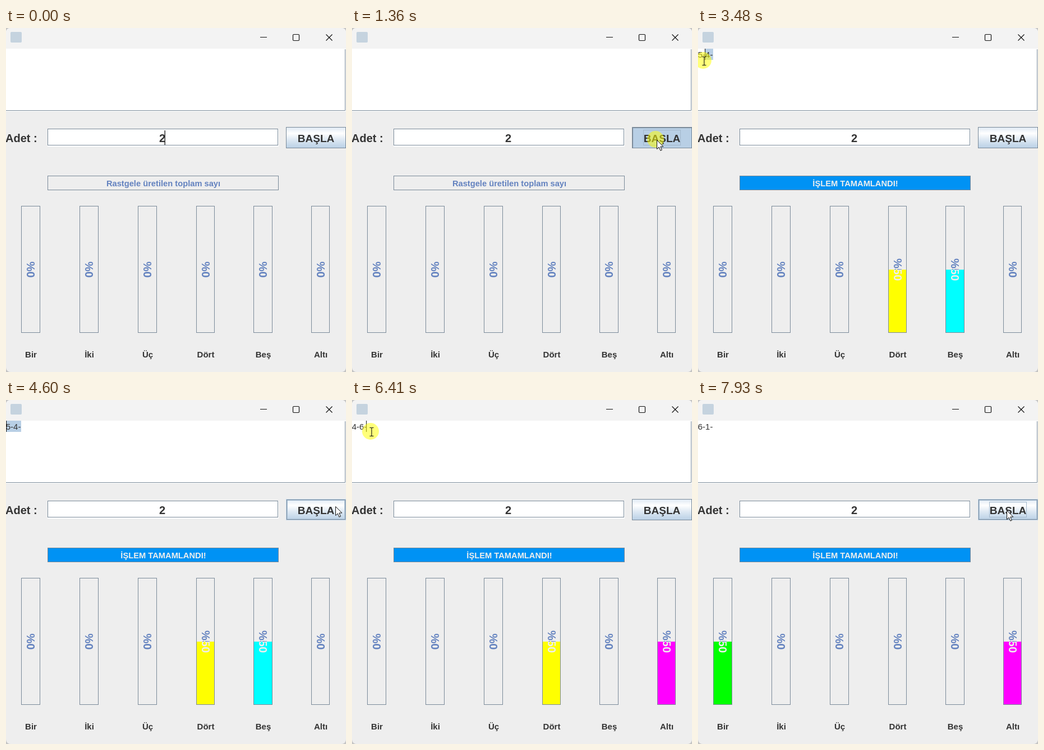
Recreate the animation shown at these times as an HTML page. Size 606 px wide and 615 px high, loop 8 s.

```html
<!DOCTYPE html>
<html lang="tr">
<head>
<meta charset="utf-8">
<style>
  html, body { margin: 0; width: 100%; height: 100%; overflow: hidden; background: #c4c4c4; }
  svg { display: block; }
  text { font-family: Arial, "Liberation Sans", sans-serif; fill: #333; white-space: pre; }
  .b { font-weight: bold; }
  .mid { text-anchor: middle; }
  .blue { fill: #6382bf; }
  .light { fill: #eee; }
  .edge { fill: none; stroke: #7a8a99; }
</style>
</head>
<body>
<svg id="stage" width="606" height="615" viewBox="0 0 606 615">
  <defs>
    <linearGradient id="metal" x2="0" y2="1">
      <stop stop-color="#dde8f3"/><stop offset=".3" stop-color="#fff"/>
      <stop offset=".6" stop-color="#dde8f3"/><stop offset="1" stop-color="#b8cfe5"/>
    </linearGradient>
  </defs>
  <rect width="606" height="615" rx="8" fill="#eee"/>
  <path d="M0 37V8Q0 0 8 0H598Q606 0 606 8V37Z" fill="#f3f3f3"/>
  <rect x="8" y="7" width="20" height="19" rx="2" fill="#c5d3df"/>
  <path d="M453 16.5h12M570.5 11.5l11 11M581.5 11.5l-11 11" stroke="#111" stroke-width="1.2"/>
  <rect x="511.5" y="11.5" width="11" height="11" rx="1.5" fill="none" stroke="#111" stroke-width="1.2"/>

  <rect y="37" width="606" height="112" fill="#fff"/>
  <path class="edge" d="M0 147.5H604.5V38"/>
  <rect id="selection" y="37" height="20" fill="#b8cfe5"/>
  <text id="log" x="-.3" y="53" font-size="15"></text>
  <rect id="logCaret" y="37" width="1.2" height="20" fill="#333"/>

  <text class="b" x="-1" y="204" font-size="20">Adet :</text>
  <rect x="74" y="180" width="412" height="32" fill="#fff"/>
  <rect class="edge" x="74.5" y="180.5" width="410" height="29"/>
  <text class="b mid" x="278.5" y="204" font-size="20">2</text>
  <rect id="fieldCaret" x="282.5" y="183" width="1.5" height="26" fill="#333"/>

  <rect id="button" x="499" y="177" width="107" height="38"/>
  <rect class="edge" x="499.5" y="177.5" width="106" height="37"/>
  <path id="pressed" class="edge" d="M500.5 214V178.5H605"/>
  <g id="hover" fill="none">
    <rect x="499.5" y="177.5" width="106" height="37" stroke="#b8cfe5"/>
    <rect x="500.5" y="178.5" width="104" height="35" stroke="#7a8a99"/>
    <rect x="501.5" y="179.5" width="102" height="33" stroke="#b8cfe5"/>
  </g>
  <rect id="focus" x="519.5" y="182.5" width="66" height="27" fill="none" stroke="#a3b8cc"/>
  <text class="b mid" x="552.5" y="204" font-size="19">BAŞLA</text>

  <rect id="total" x="74" y="264" width="412" height="26"/>
  <rect class="edge" x="74.5" y="264.5" width="411" height="25"/>
  <text id="status" class="b mid" x="280.5" y="283" font-size="14.7"></text>

  <g id="bars"></g>
  <circle id="glow" r="15" fill="#ff0" opacity=".52"/>
  <path id="arrow" d="M.5 .5V16.5L4.2 13 6.8 19.2 9.4 18.1 6.8 12H11.8Z" fill="#fff" stroke="#111"/>
  <path id="beam" d="M-3.5 -7.5H-1Q0 -7.5 0 -6.5Q0 -7.5 1 -7.5H3.5M0 -6.5V6.5M-3.5 7.5H-1Q0 7.5 0 6.5Q0 7.5 1 7.5H3.5" fill="none" stroke="#111" stroke-width="1.1"/>
</svg>
<script>
const LOOP = 8000;
const $ = id => document.getElementById(id);
const show = (id, on) => $(id).style.display = on ? '' : 'none';
const within = (t, spans) => spans.some(([a, b]) => t >= a && t < b);

// name, left edge, width, fill colour
const bars = [
  ['Bir', 27, 34, '#0f0'], ['İki', 131, 34, '#f00'], ['Üç', 235, 34, '#00f'],
  ['Dört', 339, 33, '#ff0'], ['Beş', 441, 34, '#0ff'], ['Altı', 544, 33, '#f0f']
];
$('bars').innerHTML = bars.map(([name, x, w, color]) => {
  const label = (cls, cx, cy) =>
    `<text class="b mid value ${cls}" transform="translate(${cx} ${cy}) rotate(90)" y="7" font-size="20"></text>`;
  return label('blue', x + w / 2, 432) +
    `<svg class="fill" x="${x + 1}" y="432" width="${w - 2}" height="112">
       <rect width="100%" height="100%" fill="${color}"/>${label('light', w / 2 - 1, 0)}
     </svg>
     <rect class="edge" x="${x + .5}" y="318.5" width="${w - 1}" height="226"/>
     <text class="b mid" x="${x + w / 2 + .5}" y="589" font-size="15">${name}</text>`;
}).join('');
const fills = [...document.querySelectorAll('.fill')];
const values = [...document.querySelectorAll('.value')];

// time and rolled dice
const rolls = [[0, []], [1400, [5, 4]], [4840, [4, 6]], [7850, [6, 1]]];

// pointer: time, x, y
const path = [
  [200, 420, 640], [960, 542, 201], [1200, 542, 201], [1360, 543, 200],
  [2120, 543, 200], [2400, 97, 132], [2880, 29, 74], [3040, 29, 74],
  [3680, 5, 55], [4080, 5, 55], [4320, 587, 190], [4600, 587, 190],
  [4760, 552, 195], [5200, 552, 195], [5320, 530, 192], [5920, 70, 66],
  [6040, 70, 66], [6340, 35, 57], [6480, 35, 57], [6810, 4, 56],
  [6890, 4, 56], [7490, 550, 200], [7690, 550, 200], [7930, 550, 197]
];
const clicks = [[1360, 1480], [3000, 3920], [4760, 4920], [6400, 6890], [7690, 7930]];
const presses = [[1360, 1400], [4760, 4840], [7690, 7850]];
const buttonFocus = [[1360, 3000], [4760, 6400], [7690, LOOP]];
const logFocus = [[3000, 4760], [6400, 7690]];
const caretStops = [0, 8, 13, 21, 26];

function pointer(t) {
  const i = path.findIndex(p => p[0] > t);
  if (i < 0) return path.at(-1).slice(1);
  if (!i) return path[0].slice(1);
  const [t0, x0, y0] = path[i - 1], [t1, x1, y1] = path[i];
  const u = (t - t0) / (t1 - t0), e = u * u * (3 - 2 * u);
  return [x0 + (x1 - x0) * e, y0 + (y1 - y0) * e].map(Math.round);
}

function render(t) {
  const dice = rolls.findLast(r => r[0] <= t)[1], done = dice.length > 0;
  $('log').textContent = dice.map(d => d + '-').join('');
  $('status').textContent = done ? 'İŞLEM TAMAMLANDI!' : 'Rastgele üretilen toplam sayı';
  $('status').setAttribute('class', 'b mid ' + (done ? 'light' : 'blue'));
  $('total').setAttribute('fill', done ? '#0092f4' : '#eee');
  bars.forEach((_, i) => {
    const hit = dice.includes(i + 1);
    fills[i].style.display = hit ? '' : 'none';
    values[2 * i].textContent = values[2 * i + 1].textContent = hit ? '%50' : '%0';
  });

  const [x, y] = pointer(t), visible = t >= 200;
  const overLog = y >= 37 && y < 149;
  const overField = x >= 74 && x < 486 && y >= 180 && y < 212;
  const overButton = x >= 499 && y >= 177 && y < 215;
  const beam = overLog || overField, down = within(t, presses);
  show('arrow', visible && !beam);
  show('beam', visible && beam);
  for (const id of ['arrow', 'beam']) $(id).setAttribute('transform', `translate(${x} ${y})`);
  show('glow', within(t, clicks));
  $('glow').setAttribute('transform', `translate(${x - 2} ${y - 1})`);

  $('button').setAttribute('fill', down ? '#b8cfe5' : 'url(#metal)');
  show('pressed', down);
  show('hover', overButton && !down);
  show('focus', within(t, buttonFocus));
  show('fieldCaret', t < 460 || t >= 960 && t < 1360);

  const editing = within(t, logFocus);
  const dragX = t > 3920 && t < 4760 || t > 6890 ? 0 : x;
  const caret = caretStops.reduce((a, b) => Math.abs(b - dragX) < Math.abs(a - dragX) ? b : a);
  const left = dragX < 6 ? 0 : caret;
  show('logCaret', editing);
  show('selection', editing && left < 26);
  $('logCaret').setAttribute('x', Math.max(0, left - 1));
  $('selection').setAttribute('x', left);
  $('selection').setAttribute('width', 27 - left);
}

const start = performance.now();
function tick() {
  render((performance.now() - start) % LOOP);
  requestAnimationFrame(tick);
}
tick();
</script>
</body>
</html>
```
